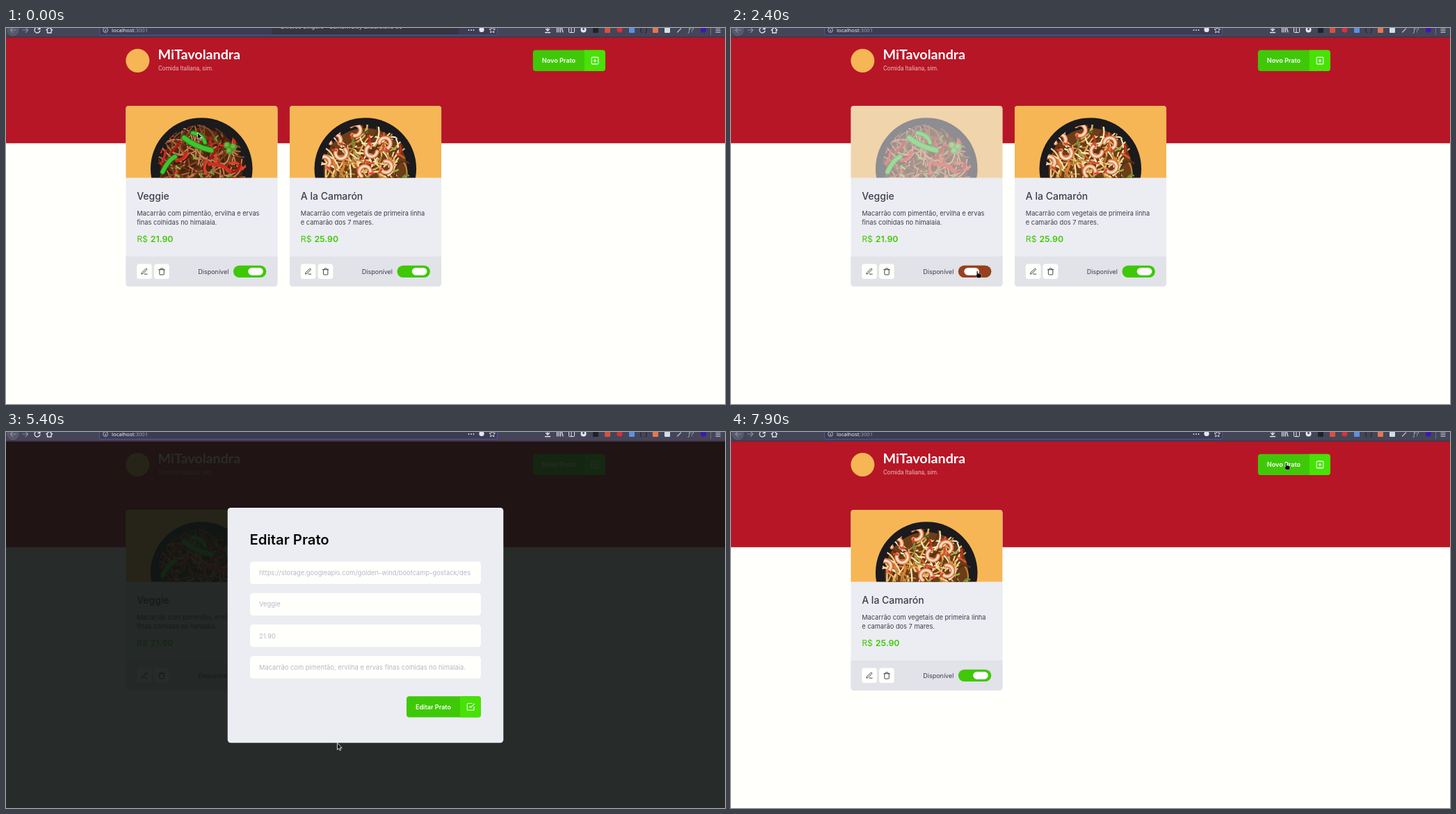
An HTML page that plays this animation: 1034x541 px, repeating every 8000 ms.

```html
<!DOCTYPE html>
<html lang="pt">
<head>
<meta charset="utf-8">
<title>Pratos</title>
<style>
html, body { margin: 0; width: 100%; height: 100%; overflow: hidden; background: #fffffb; }
svg { display: block; width: 100%; height: 100%; }
text { font-family: Inter, sans-serif; white-space: pre; }
.line { fill: none; stroke-linecap: round; stroke-linejoin: round; }
</style>
</head>
<body>
<svg id="stage" viewBox="0 0 1034 541" xmlns="http://www.w3.org/2000/svg"></svg>
<script>
const LOOP = 8000, STEP = 100;
const GREEN = '#3fc808', LIME = '#47e206', RED = '#b71626', INK = '#3d3d4d';
const PAPER = '#fffffb', PANEL = '#ecedf2', GOLD = '#f6b655';
const LEFT = 172.2, NEXT = 407.8, CARD = 218.3;

const rect = (x, y, w, h, fill, r = 0, more = '') =>
  `<rect x="${x}" y="${y}" width="${w}" height="${h}" rx="${r}" fill="${fill}" ${more}/>`;
const circle = (x, y, r, fill, more = '') =>
  `<circle cx="${x}" cy="${y}" r="${r}" fill="${fill}" ${more}/>`;
const line = (d, color, w = 1, more = '') =>
  `<path class="line" d="${d}" stroke="${color}" stroke-width="${w}" ${more}/>`;
const text = (x, y, size, fill, str, weight = 400, more = '') =>
  `<text x="${x}" y="${y}" font-size="${size}" fill="${fill}" font-weight="${weight}" ${more}>${str}</text>`;
const at = (x, y, body, scale = 1) => `<g transform="translate(${x} ${y}) scale(${scale})">${body}</g>`;

function random(seed) {
  return () => (seed = (seed * 16807) % 2147483647) / 2147483647;
}

// Scattered curved strands inside the plate
function strands(rnd, count, colors, width, len) {
  let out = '';
  for (let i = 0; i < count; i++) {
    const a = rnd() * 6.283, r = 59 * Math.sqrt(rnd()), dir = rnd() * 6.283;
    const x = 109 + r * Math.cos(a), y = 92 + r * Math.sin(a);
    const dx = len * Math.cos(dir), dy = len * Math.sin(dir), bend = (rnd() - 0.5) * 1.2;
    const n = v => v.toFixed(1);
    out += line(`M${n(x - dx / 2)} ${n(y - dy / 2)}q${n(dx / 2 - dy * bend)} ${n(dy / 2 + dx * bend)} ${n(dx)} ${n(dy)}`,
      colors[i % colors.length], width);
  }
  return out;
}

const plate = food => rect(0, 0, 219, 104, GOLD) + circle(109, 90.5, 73.3, '#1b1a1d') +
  `<g clip-path="url(#food)">${food}</g>`;

function veggie() {
  const rnd = random(71);
  const pod = (d, w) => line(d, '#1a7d18', w + 1.5) + line(d, '#3fc42e', w - 0.5);
  const leaf = (x, y) => circle(x, y, 5, '#4f9a2c') + circle(x - 1, y - 1, 3, '#6cb83c');
  return plate(circle(109, 92, 59, '#51260f') +
    strands(rnd, 170, ['#8a4a28', '#b06c40', '#6b3519', '#c58655', '#3d1b0d'], 1.9, 34) +
    strands(rnd, 22, ['#c9281c', '#e0402a', '#a31c14'], 3.4, 20) +
    line('M50 66q1-17 17-24M148 34q10 6 8 18M120 84q18-2 30 10', '#d42d1e', 5) +
    strands(rnd, 12, ['#5da132', '#81bb47'], 2.4, 7) +
    pod('M84 46q16 13 39 18', 7) + pod('M96 39q15 2 18 14', 5) + pod('M71 73q-10 5-18 22', 6) +
    leaf(146, 57) + leaf(155, 59) + leaf(149, 65) + leaf(69, 36));
}

function shrimp() {
  const rnd = random(907);
  const prawn = ([x, y, turn]) => {
    const d = 'M-8 4a8 8 0 1 1 12 5';
    return `<g transform="translate(${x} ${y}) rotate(${turn})">` + line(d, '#b9532c', 6.6) +
      line(d, '#f0a277', 5.2) + line(d, '#fde3cb', 2.2) + line('M4 9l4 3', '#d4482e', 3) + '</g>';
  };
  const spots = [[65, 47, -20], [96, 34, 60], [138, 52, 20], [75, 70, 150], [50, 79, 0], [117, 67, 200], [141, 88, 90], [107, 93, -40]];
  return plate(circle(109, 92, 60, '#6b3d18') +
    strands(rnd, 160, ['#f3d48f', '#e2ad58', '#fbeabf', '#c08236', '#5a3014'], 2.2, 28) +
    strands(rnd, 20, ['#d9552a', '#e77f32', '#bd3722'], 3, 13) +
    strands(rnd, 15, ['#6f9134', '#9aad45', '#43652a'], 2.6, 10) + spots.map(prawn).join(''));
}

const pencil = line('M12 20h9M16.5 3.5a2.12 2.12 0 0 1 3 3L7 19l-4 1 1-4z', '#33333f', 2);
const trash = line('M3 6h18M19 6v14a2 2 0 0 1-2 2H7a2 2 0 0 1-2-2V6m3 0V4a2 2 0 0 1 2-2h4a2 2 0 0 1 2 2v2', '#33333f', 2);
const plus = line('M5 3h14a2 2 0 0 1 2 2v14a2 2 0 0 1-2 2H5a2 2 0 0 1-2-2V5a2 2 0 0 1 2-2zM12 8v8M8 12h8', '#fff', 2);
const check = line('M9 11l3 3L22 4M21 12v7a2 2 0 0 1-2 2H5a2 2 0 0 1-2-2V5a2 2 0 0 1 2-2h11', '#fff', 2);

function card(id, x, dish, name, lines, price) {
  return `<g id="${id}" transform="translate(${x} 112)"><g clip-path="url(#card)">` +
    rect(0, 0, 219, 260, PANEL) + `<g class="photo" clip-path="url(#photo)">${dish}</g>` +
    rect(0, 216.7, 219, 44, '#e2e2e9') + '</g>' +
    text(16, 134.5, 14, INK, name, 500) +
    lines.map((s, i) => text(16, 157.8 + 13 * i, 9.25, INK, s)).join('') +
    text(16, 196.3, 12.3, GREEN, `R$ <tspan x="35.6" font-weight="600">${price}</tspan>`) +
    rect(16, 227.5, 21.6, 21.6, PAPER, 3.5) + at(21.3, 232.9, pencil, 0.46) +
    rect(40.9, 227.5, 21.6, 21.6, PAPER, 3.5) + at(46.3, 232.9, trash, 0.46) +
    rect(20.7, 233.2, 12.4, 10.6, 'none', 0, 'class="ring" stroke="#666" stroke-width=".7" stroke-dasharray=".8 .6" visibility="hidden"') +
    text(148.2, 241.7, 9, INK, 'Disponível', 400, 'class="label" text-anchor="end"') +
    rect(154.7, 229.7, 47.4, 17.2, GREEN, 8.6) + rect(154.7, 229.7, 47.4, 17.2, '#b01c26', 8.6, 'class="off" opacity="0"') +
    rect(176, 232.9, 21.6, 10.8, '#fff', 5.4, 'class="knob"') + '</g>';
}

function button(x, y, w, label, icon) {
  const split = x + w - 30;
  return rect(x, y, w, 30.2, GREEN, 4) +
    `<path d="M${split} ${y}h26a4 4 0 0 1 4 4v22.200a4 4 0 0 1-4 4h-26z" fill="${LIME}"/>` +
    text(x + 13, y + 18.3, 9.05, '#fff', label, 600) + at(split + 8.7, y + 8.7, icon, 0.54);
}

function toolbar() {
  const w = '#e6e6f0', dim = '#8c8ca2';
  const dots = [665.5, 669, 672.5].map(x => circle(x, 3, 0.9, w)).join('');
  const squares = [[848, '#20222b'], [865, '#d8503f'], [900, '#5d8fe0'], [934, '#e6764d'], [951, '#cfe0e6']]
    .map(([x, c]) => rect(x - 4, -1, 8, 8, c, 1)).join('');
  return rect(0, 0, 1034, 13.4, '#444558') + rect(0, 12.6, 1034, 0.9, '#303040') +
    circle(10, 3, 8, '#57586c', 'stroke="#6b6c80" stroke-width=".6"') +
    line('M14 3H6.5m3.2-3.3L6.4 3l3.3 3.3', dim, 1.2) + line('M24 3h7.5M28.3-.3L31.6 3l-3.3 3.3', dim, 1.2) +
    line('M48.5 1a4 4 0 1 0 .4 3M49-1.5v3h-3', w, 1.3) + line('M58 3l4.3-4L66.6 3M59.5 3v4h5.6V3', w, 1.3) +
    rect(134.5, -8, 572, 18.3, '#3b3c52', 2, 'stroke="#5254a0"') +
    circle(143, 3, 3.4, 'none', `stroke="${w}" stroke-width=".7"`) + line('M143 2.7v2', w, 0.9) +
    text(152, 6, 7.7, '#f4f4fa', 'localhost<tspan fill="#a0a0b4">:3001</tspan>', 400, `style="font-family:'Noto Sans',sans-serif"`) +
    dots + circle(684, 2.5, 3.6, w) +
    line('M699.3-1.5l1.3 2.8 3 .4-2.2 2.1.6 3-2.7-1.5-2.7 1.5.6-3-2.2-2.1 3-.4z', w, 0.9) +
    line('M779-2v6m-2.5-2.5L779 4l2.5-2.5M775.5 6.5h7', w, 1.3) +
    line('M792.5-1v7M795-1v7M797.5-1v7M799-1l2 7', w, 1.2) +
    rect(809.5, -1.5, 8, 8, 'none', 1, `stroke="${w}"`) + line('M813-1v7', w) +
    circle(830.5, 2.5, 4, w) + circle(830.5, 1.5, 1.5, '#444558') + squares +
    circle(882.5, 2.5, 4, '#d9303a') +
    line('M914.5-1q-2 0-1.5 2t-1 2q1.5 0 1 2t1.5 2M919.5-1q2 0 1.5 2t1 2q-1.5 0-1 2t-1.5 2', '#22232d') +
    line('M965.5 6l5-5', '#b9b9c8', 1.4) + text(981, 6, 9, '#b9b9c8', 'ƒ?', 400, 'font-style="italic"') +
    circle(1003, 2.5, 4, '#3d18b4') + rect(1013, 0, 0.8, 10, '#77788c') +
    line('M1021 0h6M1021 3h6M1021 6h6', w, 1.2) +
    `<g id="tip">` + rect(382, -6, 269.5, 15, '#343541', 2) +
    text(482.5, 1.3, 8.3, '#c8c8d2', 'Diverse Singers - Lumenvaley Excursions 05', 400, 'text-anchor="middle"') + '</g>';
}

function modal() {
  const fields = ['https://storage.googleapis.com/golden-wind/bootcamp-gostack/des', 'Veggie', '21.90',
    'Macarrão com pimentão, ervilha e ervas finas colhidas no himalaia.'];
  return `<g id="modal">` + rect(0, 13.5, 1034, 528, '#101412', 0, 'opacity=".9"') +
    rect(318.7, 109, 396.6, 338.2, PANEL, 4.5) + text(350.5, 162.3, 20.3, '#080808', 'Editar Prato', 600) +
    fields.map((s, i) => rect(351, 186.6 + 45.25 * i, 332, 32.2, PAPER, 4.5) +
      text(364, 206.1 + 45.25 * i, 9.35, '#b7b7cc', s)).join('') +
    button(576, 380.2, 107, 'Editar Prato', check) + '</g>';
}

const stage = document.getElementById('stage');
stage.innerHTML = `<defs>
  <clipPath id="card"><rect width="${CARD}" height="259.8" rx="4.3"/></clipPath>
  <clipPath id="photo"><rect width="${CARD}" height="103.5"/></clipPath>
  <clipPath id="food"><circle cx="109" cy="91" r="64"/></clipPath></defs>` +
  rect(0, 0, 1034, 541, PAPER) + rect(0, 13, 1034, 152.8, RED) +
  circle(189.3, 47, 17, GOLD) +
  text(218.5, 45.3, 19.7, '#fff', 'MiTavolandra', 700, 'style="font-family:Lato,sans-serif"') +
  text(219, 60.8, 8.5, '#eab9bd', 'Comida Italiana, sim.', 400, 'style="font-family:Roboto,sans-serif"') +
  button(757.8, 31.8, 104, 'Novo Prato', plus) +
  card('first', LEFT, veggie(), 'Veggie', ['Macarrão com pimentão, ervilha e ervas', 'finas colhidas no himalaia.'], '21.90') +
  card('second', NEXT, shrimp(), 'A la Camarón', ['Macarrão com vegetais de primeira linha', 'e camarão dos 7 mares.'], '25.90') +
  modal() + toolbar() +
  `<g id="cursor" fill="#0c0c0c" stroke="#fff" stroke-width=".8" stroke-linejoin="round">
  <path id="arrow" d="M.4.4v9.8l2.2-2 1.5 3.1 1.5-.7-1.5-3h3z"/>
  <path id="hand" d="M2.3 1q1-1 1.7 0v3l4 .9q1.2.4 1 1.600l-.7 4H3.300L.8 7q0-1 1.500-.4z" stroke-width=".4"/></g>`;

const pick = q => stage.querySelector(q);
const tip = pick('#tip'), dialog = pick('#modal'), cursor = pick('#cursor'), arrow = pick('#arrow'), hand = pick('#hand');
const first = pick('#first'), second = pick('#second');
const [photo, ring, label, off, knob] = ['photo', 'ring', 'label', 'off', 'knob'].map(c => first.querySelector('.' + c));

// Pointer stops: time, x, y
const stops = [[0, 275, 150], [600, 275, 150], [900, 383, 346], [1000, 383, 346], [1200, 351, 349], [2500, 351, 349],
  [2800, 362, 365], [2900, 362, 365], [3200, 198, 353], [3400, 198, 353], [3800, 568, 369], [3900, 568, 369],
  [4200, 597, 398], [5100, 597, 398], [5400, 476, 447], [5500, 476, 447], [5600, 463, 454], [6100, 274, 345],
  [6200, 274, 345], [6400, 223, 349], [7000, 223, 349], [7500, 780, 131], [7600, 780, 131], [7900, 795, 44], [8000, 795, 44]];
const overButton = [[1100, 2600], [3200, 3300], [4200, 5200], [6400, 6900], [7900, 8000]];

const within = (t, a, b) => t >= a && t < b;
const show = (el, on) => el.setAttribute('visibility', on ? 'visible' : 'hidden');
function ease(t, start, span) {
  const p = Math.min(1, Math.max(0, (t - start) / span));
  return p * p * (3 - 2 * p);
}
function pointer(t) {
  const i = stops.findIndex(s => s[0] > t), [a, x, y] = stops[i - 1], [b, u, v] = stops[i];
  const p = (t - a) / (b - a);
  return [x + (u - x) * p, y + (v - y) * p];
}

function draw(ms) {
  const t = Math.floor((ms % LOOP) / STEP) * STEP;
  const p = ease(t, 1130, 370) - ease(t, 2280, 400);
  const removed = t >= 6700;
  tip.setAttribute('opacity', t < 100 ? 1 : t < 200 ? 0.5 : 0);
  photo.setAttribute('opacity', 1 - 0.7 * p);
  off.setAttribute('opacity', p);
  knob.setAttribute('x', 176 - 16.5 * p);
  label.textContent = within(t, 1200, 2300) ? 'Indisponível' : 'Disponível';
  ring.setAttribute('x', t < 6600 ? 20.7 : 45.7);
  show(ring, within(t, 5600, 6700));
  first.setAttribute('display', removed ? 'none' : 'inline');
  second.setAttribute('transform', `translate(${removed ? LEFT : NEXT} 112)`);
  show(dialog, within(t, 3300, 5600));
  const pointing = overButton.some(([a, b]) => within(t, a, b));
  show(arrow, !pointing);
  show(hand, pointing);
  cursor.setAttribute('transform', `translate(${pointer(t).join(' ')})`);
}

const start = performance.now();
function tick() {
  draw(performance.now() - start);
  requestAnimationFrame(tick);
}
tick();
</script>
</body>
</html>
```
